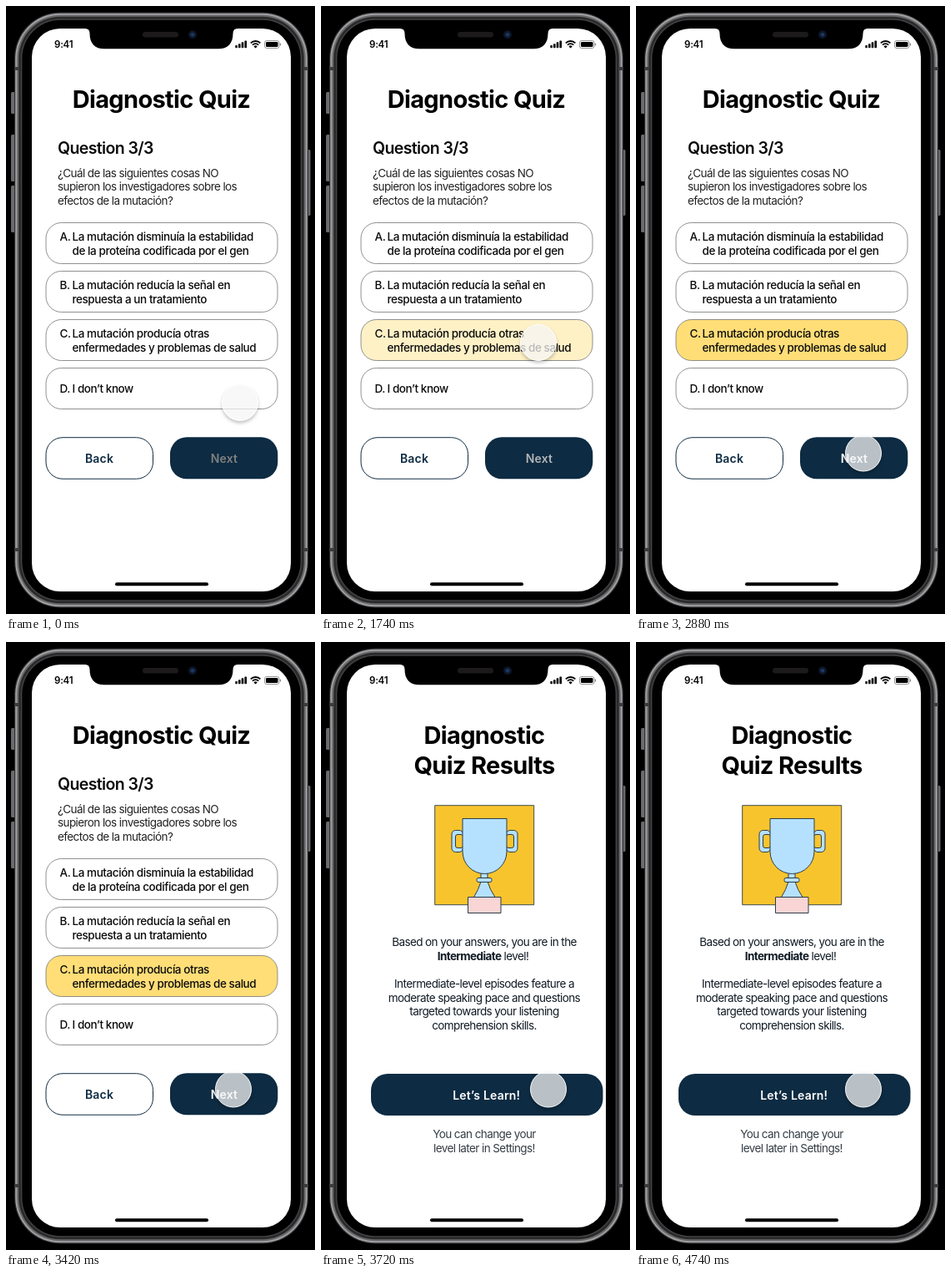
An HTML page with a canvas for the animation above (5340 ms loop, 371 by 728 pixels).

```html
<!DOCTYPE html>
<html lang="es">
<head>
<meta charset="utf-8">
<title>Diagnostic Quiz</title>
<style>
html, body { margin: 0; width: 100%; height: 100%; overflow: hidden; background: #000; }
canvas { display: block; width: 371px; height: 728px; }
</style>
</head>
<body>
<canvas id="stage"></canvas>
<script>
const W = 371, H = 728, LOOP = 5340;
const SCREEN = { x: 31, y: 27, w: 311, h: 674, r: 34 };
const NAVY = '#0d2b42', INK = '#0b0b0d';
const canvas = document.getElementById('stage');
const ctx = canvas.getContext('2d');
const dpr = window.devicePixelRatio || 1;
canvas.width = W * dpr;
canvas.height = H * dpr;

// weight, size, letter spacing
const FONT = {
  title: [700, 29, -0.66],
  heading: [600, 19.5, -0.62],
  body: [400, 13.5, -0.59],
  strong: [700, 13.5, -0.6],
  option: [500, 13.5, -0.43],
  button: [600, 14, 0.2],
  clock: [600, 11.5, -0.2]
};

const OPTIONS = [
  ['A.', 'La mutación disminuía la estabilidad', 'de la proteína codificada por el gen'],
  ['B.', 'La mutación reducía la señal en', 'respuesta a un tratamiento'],
  ['C.', 'La mutación producía otras', 'enfermedades y problemas de salud'],
  ['D.', 'I don’t know']
];

const lerp = (a, b, k) => a + (b - a) * k;
const progress = (t, start, length) => Math.min(1, Math.max(0, (t - start) / length));
const easeInOut = k => k < 0.5 ? 4 * k ** 3 : 1 - 4 * (1 - k) ** 3;

function setFont(style) {
  const [weight, size, spacing] = FONT[style];
  ctx.font = `${weight} ${size}px Inter, "Open Sans", sans-serif`;
  ctx.letterSpacing = spacing + 'px';
}

function text(str, x, y, style, color = INK, align = 'left') {
  setFont(style);
  ctx.textAlign = align;
  ctx.fillStyle = color;
  ctx.fillText(str, x, y);
}

function paint(fill, stroke, width = 1) {
  if (fill) { ctx.fillStyle = fill; ctx.fill(); }
  if (stroke) { ctx.strokeStyle = stroke; ctx.lineWidth = width; ctx.stroke(); }
}

function box(x, y, w, h, r, fill, stroke, width) {
  ctx.beginPath();
  ctx.roundRect(x, y, w, h, r);
  paint(fill, stroke, width);
}

function disc(x, y, r, fill, stroke, width) {
  ctx.beginPath();
  ctx.arc(x, y, r, 0, Math.PI * 2);
  paint(fill, stroke, width);
}

function drawBody() {
  ctx.fillStyle = '#000';
  ctx.fillRect(0, 0, W, H);
  for (const [y, h] of [[103, 26], [154, 56], [215, 56]]) box(6, y, 5, h, 1.5, '#6a6a6c');
  box(361, 172, 4.5, 79, 1.5, '#6a6a6c');

  const layers = [
    [0, '#2e2e30'], [1.2, '#a0a0a2'], [3.2, '#6a6a6c'], [5.2, '#2a2a2b'],
    [8, '#454547'], [9.3, '#000']
  ];
  for (const [d, color] of layers) box(10 + d, 7.5 + d, 353 - 2 * d, 713 - 2 * d, 55 - d, color);

  for (const y of [73, 649]) {
    box(10, y, 6, 4, 0, '#3c3c3e');
    box(357, y, 6, 4, 0, '#3c3c3e');
  }
}

function drawNotch() {
  ctx.beginPath();
  ctx.moveTo(95, 26);
  ctx.lineTo(95, 27);
  ctx.quadraticCurveTo(100.5, 27, 100.5, 33);
  ctx.bezierCurveTo(100.5, 45, 107, 51.3, 118, 51.3);
  ctx.lineTo(255, 51.3);
  ctx.bezierCurveTo(266, 51.3, 272.5, 45, 272.5, 33);
  ctx.quadraticCurveTo(272.5, 27, 278, 27);
  ctx.lineTo(278, 26);
  paint('#000');
  box(164, 31, 43, 6.5, 3.2, '#1d1a1b');
  disc(224, 34.3, 5, '#0d1626');
  disc(224, 34.3, 2.4, '#1b3763');
}

function drawStatus() {
  text('9:41', 58, 50, 'clock', '#000');
  for (let i = 0; i < 4; i++) {
    const h = 3.2 + i * 1.9;
    box(275.3 + i * 3.7, 50.3 - h, 2.6, h, 0.7, '#000');
  }

  ctx.lineCap = 'butt';
  for (const r of [8.2, 5.1]) {
    ctx.beginPath();
    ctx.arc(299.6, 50.2, r, -Math.PI * 0.75, -Math.PI * 0.25);
    paint(null, '#000', 1.8);
  }
  ctx.beginPath();
  ctx.moveTo(299.6, 50.5);
  ctx.arc(299.6, 50.5, 3, -Math.PI * 0.75, -Math.PI * 0.25);
  paint('#000');

  box(310.5, 41.5, 17.5, 9, 2.4, null, '#8a8a8a', 0.9);
  box(312, 43, 14.5, 6, 1.3, '#000');
  box(328.9, 44.6, 1.2, 3, 0.6, '#8a8a8a');
}

function drawQuiz(selected) {
  text('Diagnostic Quiz', 186.5, 122, 'title', '#000', 'center');
  text('Question 3/3', 62, 176.5, 'heading');
  ['¿Cuál de las siguientes cosas NO',
   'supieron los investigadores sobre los',
   'efectos de la mutación?'].forEach((line, i) => text(line, 62, 204.5 + i * 16.6, 'body', '#222'));

  OPTIONS.forEach(([label, ...lines], i) => {
    const top = 259.5 + i * 58;
    box(48, top, 278, 49, 18.5, '#fff');
    if (i === 2) {
      ctx.globalAlpha = selected;
      box(48, top, 278, 49, 18.5, '#ffde77');
      ctx.globalAlpha = 1;
    }
    box(48, top, 278, 49, 18.5, null, '#747474', 0.8);
    const first = top + (lines.length > 1 ? 21.5 : 29.5);
    text(label, 64.5, first, 'option');
    lines.forEach((line, n) => text(line, 79.5, first + n * 16.6, 'option'));
  });

  box(48, 516.7, 128.5, 49.5, 20, '#fff', NAVY, 1);
  text('Back', 112, 547, 'button', NAVY, 'center');
  box(197, 516.3, 129.3, 50, 20, NAVY);
  const tone = lerp(128, 255, selected);
  text('Next', 261.9, 547, 'button', `rgb(${tone},${tone},${tone})`, 'center');
}

function drawTrophy() {
  const blue = '#b5e1ff', line = '#2c3c48';
  box(127.7, 195.7, 119, 119, 0, '#f8c42e', line, 0.9);

  for (const x of [148, 213.5]) {
    box(x, 225.5, 13.5, 26, 4.5, blue, line);
    box(x + (x < 187 ? 4.5 : 0), 230.5, 9, 16, 2.5, '#f8c42e', line);
  }

  ctx.beginPath();
  ctx.moveTo(183, 287);
  ctx.lineTo(191, 287);
  ctx.quadraticCurveTo(194, 297, 200, 305.5);
  ctx.lineTo(174.5, 305.5);
  ctx.quadraticCurveTo(180, 297, 183, 287);
  paint(blue, line);
  box(183, 275, 8, 8, 0, blue, line);
  box(178, 282.5, 18, 5, 2, blue, line);

  ctx.beginPath();
  ctx.moveTo(161, 211.5);
  ctx.lineTo(214, 211.5);
  ctx.lineTo(214, 251);
  ctx.arc(187.5, 251, 26.5, 0, Math.PI);
  ctx.closePath();
  paint(blue, line);
  box(167.5, 305.5, 39.5, 19, 0, '#f9d5d5', line);
}

function drawLevel(y) {
  const parts = [['Intermediate', 'strong'], [' level!', 'body']];
  const widths = parts.map(([str, style]) => {
    setFont(style);
    return ctx.measureText(str).width;
  });
  let x = 185.5 - (widths[0] + widths[1]) / 2;
  parts.forEach(([str, style], i) => {
    text(str, x, y, style, '#101a24');
    x += widths[i];
  });
}

function drawResults() {
  const mid = (str, y, style, color) => text(str, 187, y, style, color, 'center');
  mid('Diagnostic', 122, 'title', '#000');
  mid('Quiz Results', 158, 'title', '#000');
  drawTrophy();
  mid('Based on your answers, you are in the', 364, 'body', '#101a24');
  drawLevel(380.7);
  ['Intermediate-level episodes feature a',
   'moderate speaking pace and questions',
   'targeted towards your listening',
   'comprehension skills.'].forEach((line, i) => mid(line, 414 + i * 16.6, 'body', '#101a24'));
  box(51, 517, 278.5, 50, 20, NAVY);
  text('Let’s Learn!', 189.7, 548, 'button', '#fff', 'center');
  mid('You can change your', 594, 'body', '#333c44');
  mid('level later in Settings!', 610.5, 'body', '#333c44');
}

function pointerAt(t) {
  if (t < 1600) {
    const k = easeInOut(progress(t, 20, 400));
    return [lerp(281, 261, k), lerp(475, 403, k)];
  }
  // slight bow to the left on the way down
  const k = easeInOut(progress(t, 2120, 729));
  return [(1 - k) ** 2 * 261 + 2 * k * (1 - k) * 246 + k * k * 273, lerp(403, 535.5, k)];
}

function drawPointer([x, y]) {
  const r = 21.5;
  // keep the shadow outside the translucent disc
  ctx.save();
  ctx.beginPath();
  ctx.rect(0, 0, W, H);
  ctx.arc(x, y, r, 0, Math.PI * 2);
  ctx.clip('evenodd');
  ctx.shadowColor = 'rgba(0,0,0,0.28)';
  ctx.shadowBlur = 4 * dpr;
  ctx.shadowOffsetY = 2.5 * dpr;
  disc(x, y, r, '#fff');
  ctx.restore();
  disc(x, y, r, 'rgba(246,246,246,0.74)');
  disc(x, y, r, null, 'rgba(255,255,255,0.9)', 1);
}

function render(t) {
  ctx.setTransform(dpr, 0, 0, dpr, 0, 0);
  drawBody();
  ctx.save();
  box(SCREEN.x, SCREEN.y, SCREEN.w, SCREEN.h, SCREEN.r, '#fff');
  ctx.clip();

  const slide = easeInOut(progress(t, 3479, 300)) * SCREEN.w;
  if (slide < SCREEN.w) {
    ctx.save();
    ctx.translate(-slide, 0);
    drawQuiz(easeInOut(progress(t, 1600, 300)));
    ctx.restore();
  }
  if (slide > 0) {
    ctx.save();
    ctx.translate(SCREEN.w - slide, 0);
    drawResults();
    ctx.restore();
  }

  drawPointer(pointerAt(t));
  drawStatus();
  box(131, 690.2, 112, 4, 2, '#000');
  ctx.restore();
  drawNotch();
}

const begin = performance.now();
function tick() {
  render((performance.now() - begin) % LOOP);
  requestAnimationFrame(tick);
}
tick();
</script>
</body>
</html>
```
